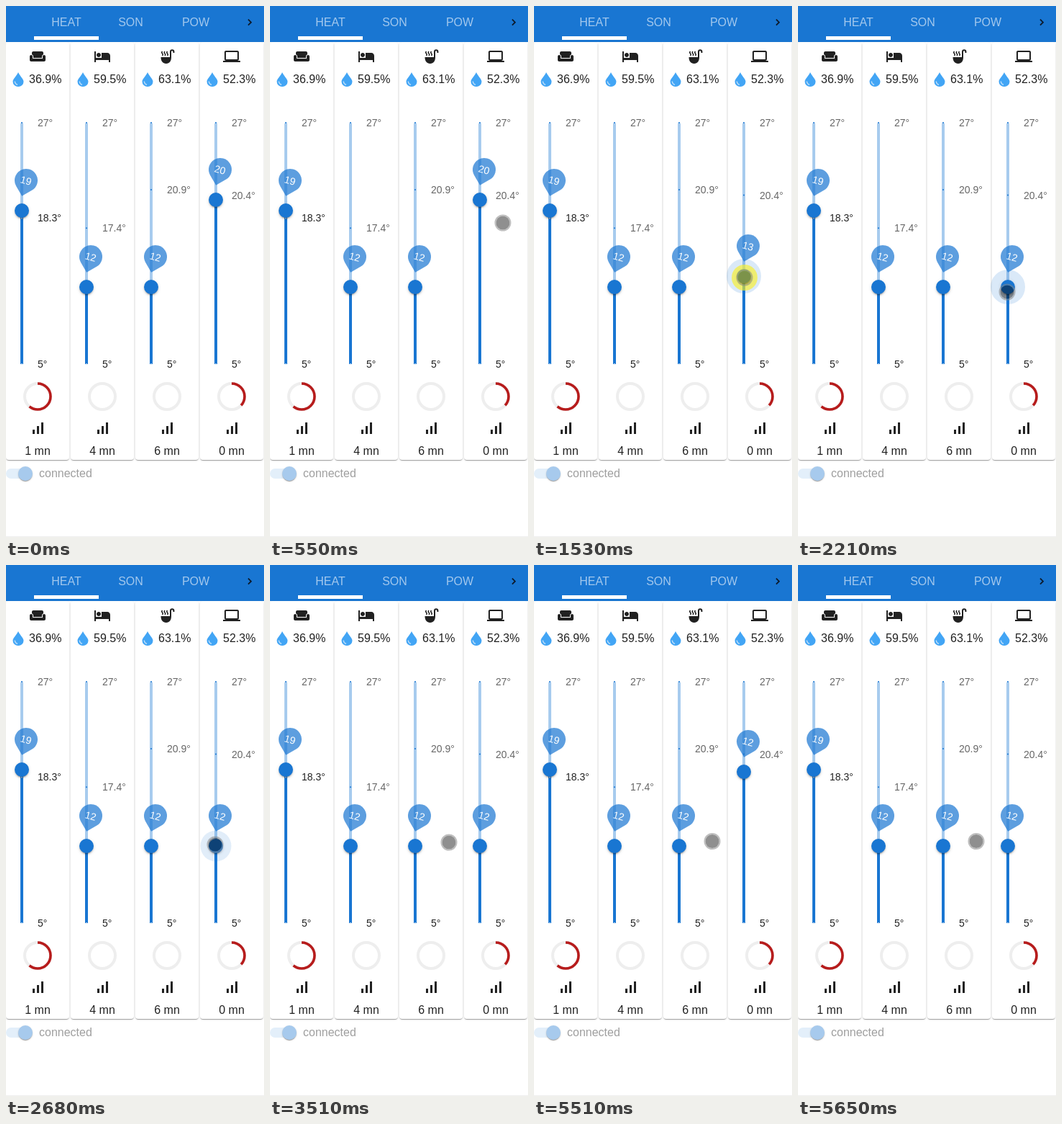
Write an HTML page that moves like this. It is 359 px wide and 737 px high and loops after 8000 ms.

```html
<!DOCTYPE html>
<html lang="en">
<head>
<meta charset="utf-8">
<title>Heating control</title>
<style>
html, body { margin: 0; width: 100%; height: 100%; overflow: hidden; background: #fff; }
body { position: relative; font-family: "Liberation Sans", Arial, sans-serif; }
body > *, .card > * { position: absolute; }
svg { left: 0; top: 0; overflow: visible; }
text { font-size: 16px; fill: rgba(0,0,0,.87); }
.mark { font-size: 14px; }
.muted { fill: rgba(0,0,0,.6); }
.card {
  top: 50px; width: 88px; height: 580px; background: #fff; border-radius: 4px;
  box-shadow: 0 2px 1px -1px rgba(0,0,0,.2), 0 1px 1px rgba(0,0,0,.14), 0 1px 3px rgba(0,0,0,.12);
}
.card svg { top: -50px; }
.rail { left: 20px; top: 112px; width: 4px; height: 335px; border-radius: 2px; background: rgba(25,118,210,.38); }
.track { left: 20px; width: 4px; bottom: 133px; background: #1976d2; }
.thumb { left: 12px; width: 20px; height: 20px; }
.thumb > * { position: absolute; border-radius: 50%; }
.knob {
  inset: 0; background: #1976d2;
  box-shadow: 0 3px 1px -2px rgba(0,0,0,.2), 0 2px 2px rgba(0,0,0,.14), 0 1px 5px rgba(0,0,0,.12);
}
.halo { inset: 0; }
.thumb > .tip {
  left: 0; top: -48px; width: 32px; height: 32px; border-radius: 50% 50% 50% 0;
  transform: rotate(-30deg); opacity: .7; background: #1976d2; color: #fff;
  display: flex; align-items: center; justify-content: center; font-size: 14px;
}
.tip span { transform: rotate(45deg); }
.switch { left: 0; top: 642px; width: 34px; height: 14px; border-radius: 7px; background: #e3effa; }
.switch i {
  position: absolute; left: 17px; top: -3px; width: 20px; height: 20px; border-radius: 50%; background: #a7caed;
  box-shadow: 0 2px 1px -1px rgba(0,0,0,.2), 0 1px 1px rgba(0,0,0,.14), 0 1px 3px rgba(0,0,0,.12);
}
</style>
</head>
<body>
<svg width="359" height="737">
  <rect width="359" height="50" fill="#1976d2"/>
  <g text-anchor="middle">
    <text x="84" y="28" style="fill:#a3c8ed">HEAT</text>
    <text x="173.5" y="28" style="fill:#a3c8ed">SON</text>
    <text x="264" y="28" style="fill:#a3c8ed">POW</text>
  </g>
  <rect x="39" y="42" width="90" height="5" fill="#fff"/>
  <path d="M337 18.7l4 4-4 4" fill="none" stroke="#0c1a2b" stroke-width="1.8"/>
  <text x="46" y="654" style="fill:rgba(0,0,0,.38)">connected</text>
  <path d="M0 736.5h359" stroke="#eee"/>
</svg>
<div class="switch"><i></i></div>

<script>
const LOOP = 8000, STEP = 70;
const TOP = 162, BOTTOM = 497, MIN = 5, MAX = 27;
const yOf = deg => BOTTOM - (deg - MIN) / (MAX - MIN) * (BOTTOM - TOP);
const degOf = y => Math.round(MIN + (BOTTOM - y) / (BOTTOM - TOP) * (MAX - MIN));

const icons = {
  sofa: '<path d="M21 10c-1.1 0-2 .9-2 2v3H5v-3c0-1.1-.9-2-2-2s-2 .9-2 2v5c0 1.1.9 2 2 2h18c1.1 0 2-.9 2-2v-5c0-1.1-.9-2-2-2zm-3-5H6c-1.1 0-2 .9-2 2v2.15c1.16.41 2 1.51 2 2.82V14h12v-2.03c0-1.3.84-2.4 2-2.82V7c0-1.1-.9-2-2-2z"/>',
  bed: '<path d="M7 13c1.66 0 3-1.34 3-3S8.66 7 7 7s-3 1.34-3 3 1.34 3 3 3zm12-6h-8v7H3V5H1v15h2v-3h18v3h2v-9c0-2.21-1.79-4-4-4z"/>',
  ladle: '<path d="M3.5 13H18c0 5.5-2.5 9-7.2 9S3.5 18.500 3.500 13z"/>' +
    '<path d="M17 14V5.500a2.200 2.200 0 0 1 4.400 0V7" fill="none" stroke="#212121" stroke-width="2"/>' +
    [5.5, 9, 12.5].map(x => `<path d="M${x} 5q-1.500 1.500 0 3t0 3" fill="none" stroke="#212121" stroke-width="1.500"/>`).join(''),
  laptop: '<path d="M20 18c1.1 0 2-.9 2-2V6c0-1.100-.9-2-2-2H4c-1.100 0-2 .9-2 2v10c0 1.100.9 2 2 2H0v2h24v-2h-4zM4 6h16v10H4V6z"/>'
};

const rooms = [
  { icon: 'sofa', humidity: '36.9%', actual: 18.3, target: 19, power: .61, age: '1 mn' },
  { icon: 'bed', humidity: '59.5%', actual: 17.4, target: 12, power: 0, age: '4 mn' },
  { icon: 'ladle', humidity: '63.1%', actual: 20.9, target: 12, power: 0, age: '6 mn' },
  { icon: 'laptop', humidity: '52.3%', actual: 20.4, target: 20, power: .37, age: '0 mn' }
];

const markLabel = (deg, target) =>
  `<text class="mark ${deg > target ? 'muted' : ''}" x="44" y="${yOf(deg) + 5}">${deg}°</text>`;
const markDot = (deg, target) =>
  `<circle cx="22" cy="${yOf(deg)}" r="1" fill="${deg > target ? '#1976d2' : '#d1e4f6'}"/>`;

function addRoom(room, index) {
  const { icon, humidity, actual, target, power, age } = room;
  const degrees = [MAX, actual, MIN];
  const card = document.createElement('div');
  card.className = 'card';
  card.style.left = index * 90 + 'px';
  card.innerHTML = `
    <div class="rail"></div><div class="track"></div>
    <svg width="88" height="737">
      <g transform="translate(32 58)" fill="#212121">${icons[icon]}</g>
      <path d="M17 92C19 97 24.500 101 24.500 105a7.500 7 0 0 1-15 0C9.500 101 15 97 17 92z" fill="#42a5f5"/>
      <path d="M12.300 104.500q.3 3.800 3.700 4.700" fill="none" stroke="#bbdefb" stroke-width="1.500"/>
      <text x="32" y="107">${humidity}</text>
      ${degrees.map(d => markLabel(d, target) + markDot(d, target)).join('')}
      <g fill="none" stroke-width="4" transform="rotate(-90 44 542)">
        <circle cx="44" cy="542" r="18" stroke="#eee"/>
        ${power ? `<circle cx="44" cy="542" r="18" stroke="#b71c1c" stroke-width="3.600" pathLength="1" stroke-dasharray="${power} 1"/>` : ''}
      </g>
      <path d="M37 588h3v6h-3zM43 583h3v11h-3zM49 578h3v16h-3z" fill="#212121"/>
      <text x="44" y="623" text-anchor="middle">${age}</text>
    </svg>
    <div class="thumb"><div class="halo"></div><div class="knob"></div><div class="tip"><span></span></div></div>`;
  document.body.append(card);
  const find = selector => card.querySelector(selector);
  const slider = { track: find('.track'), thumb: find('.thumb'), halo: find('.halo'), label: find('.tip span') };
  setSlider(slider, target, target);
  return slider;
}

function setSlider({ track, thumb, label }, position, value) {
  const y = yOf(position);
  track.style.height = BOTTOM - y + 'px';
  thumb.style.top = y - 60 + 'px';
  label.textContent = value;
}

const sliders = rooms.map(addRoom);
const active = sliders[3];

document.body.insertAdjacentHTML('beforeend', `
  <svg width="359" height="737"><g id="pointer">
    <circle id="press" r="18" fill="rgba(250,240,30,.62)"/>
    <circle id="dot" r="9.500"/>
    <circle r="10.500" fill="none" stroke="rgba(130,130,130,.52)" stroke-width="2"/>
  </g></svg>`);
const [pointer, press, dot] = ['pointer', 'press', 'dot'].map(id => document.getElementById(id));

// Pointer strokes: start time, then one position per step.
const strokes = [
  [130, [[306,719], [303,667], [309,575], [316,475], [320,380], [323,328],
         [324,301], [322,288], [316,281], [309,277], [303,275], [300,274]]],
  [970, [[300,274], [300,276], [299,281], [298,290], [297,304], [296,323],
         [295,343], [294,362], [293,377], [292,388], [291,397], [291,401.5]]],
  [2210, [[291,397], [291,392], [291,388]]],
  [2680, [[291,388], [291,392], [291,401], [292,415], [294,432], [292,447],
          [285,460], [274,467], [262,463], [253,440], [249,405], [249,385], [248,383.5]]]
];
// Halo sizes: time, radius, opacity.
const halos = [[0, 10, 0], [970, 16, .12], [1040, 22, .16], [1110, 24, .16],
               [2680, 21.5, .13], [2750, 14, .08], [2820, 10, 0]];
// Remote updates: time, old value, new value, positions per step.
const updates = [[4120, 12, 20], [5510, 20, 12]];
const glide = [.15, .78, 1];

const lastBefore = (rows, t) => rows.filter(row => row[0] <= t).pop();

function pointerAt(t) {
  const stroke = lastBefore(strokes, t);
  if (!stroke) return null;
  const [start, points] = stroke;
  return points[Math.min(points.length - 1, Math.floor((t - start) / STEP))];
}

function sliderAt(t, point) {
  const update = lastBefore(updates, t);
  if (update) {
    const [start, from, to] = update;
    const k = glide[Math.min(2, Math.floor((t - start) / STEP))];
    return [from + (to - from) * k, to];
  }
  const value = t < 970 ? 20 : t < 2680 ? degOf(point[1]) : 12;
  return [value, value];
}

function draw(t) {
  const point = pointerAt(t);
  const pressed = t >= 970 && t < 1810;
  pointer.style.display = point ? '' : 'none';
  if (point) pointer.setAttribute('transform', `translate(${point})`);
  press.style.display = pressed ? '' : 'none';
  dot.setAttribute('fill', `rgba(0,0,0,${pressed ? .24 : .44})`);
  setSlider(active, ...sliderAt(t, point));
  const [, radius, opacity] = lastBefore(halos, t);
  active.halo.style.boxShadow = `0 0 0 ${radius - 10}px rgba(25,118,210,${opacity})`;
}

const start = performance.now();
function tick() {
  draw((performance.now() - start) % LOOP);
  requestAnimationFrame(tick);
}
tick();
</script>
</body>
</html>
```
